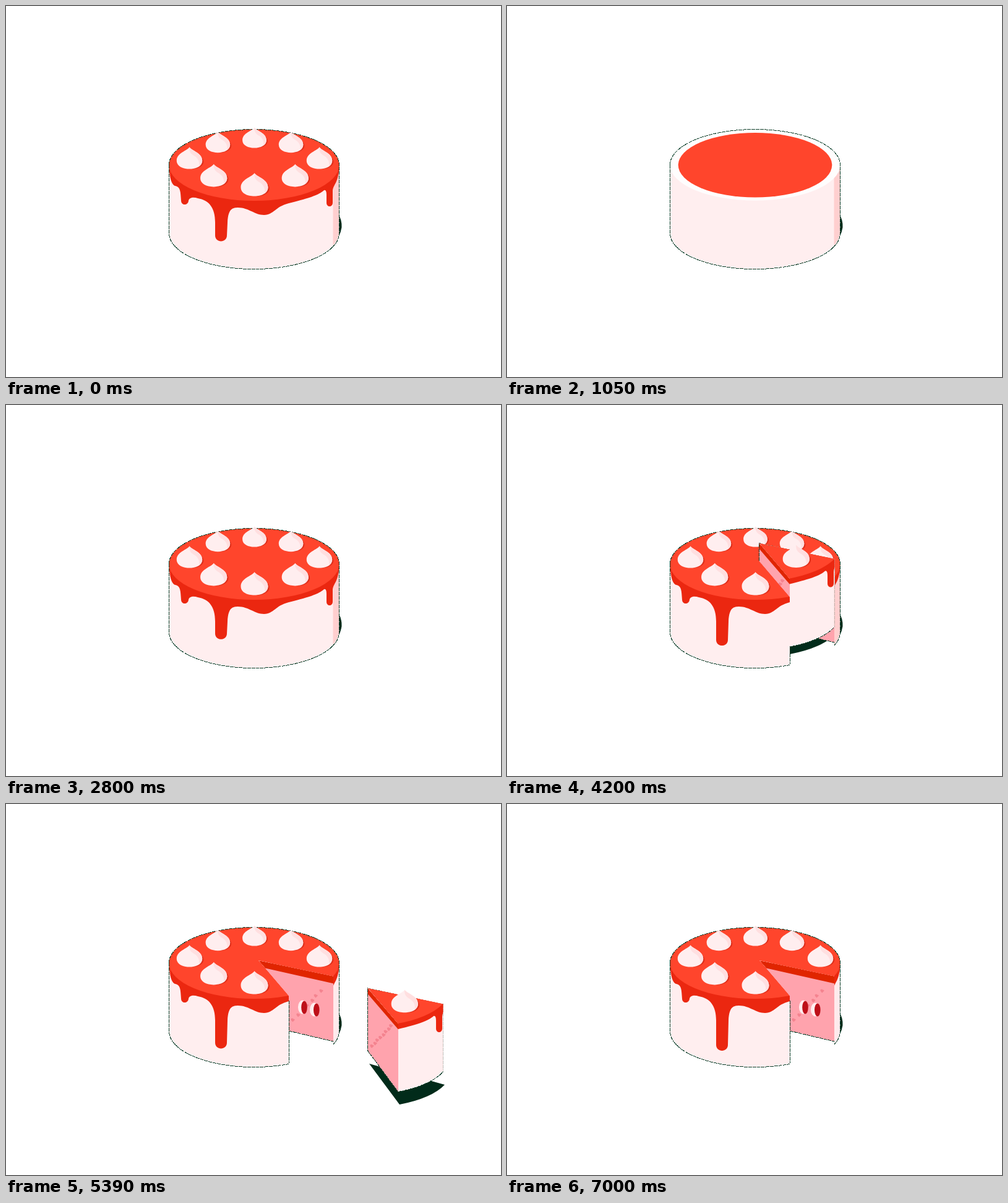
An HTML page that plays this animation: 800 px wide and 600 px high, repeating every 7420 ms.

```html
<!DOCTYPE html>
<html lang="en">
<head>
<meta charset="utf-8">
<title>Cake</title>
<style>
html, body { margin: 0; width: 100%; height: 100%; overflow: hidden; background: #fff; }
svg { display: block; width: 800px; height: 600px; }
.rim { fill: none; stroke: #0b3f2a; stroke-width: 1; stroke-dasharray: 6 1; shape-rendering: crispEdges; }
.dark { fill: #012b1a; }
.top { fill: #ff452c; }
.side { fill: #eb2710; }
.edge { fill: #e02500; }
.sponge { fill: #ffa3ad; }
.white { fill: #ffeeef; }
.pupil { fill: #bd1019; }
</style>
</head>
<body>
<svg viewBox="0 0 800 600">
  <defs>
    <clipPath id="wedge"><path d="M408 253L457 310.500V432H529.500V278.500Z"/></clipPath>
    <clipPath id="rest"><path clip-rule="evenodd" d="M0 0H800V600H0ZM408 253L457 310.500V432H529V278.500Z"/></clipPath>
    <clipPath id="behind"><path d="M400 0V243L408 253L457 310.500V600H800V0Z"/></clipPath>
    <g id="cream">
      <path fill="#df2f1a" d="M12 -7C17 -5 22 -1 22 5C22 11 14 16 4 16Z"/>
      <path class="white" d="M0 -18C4 -12 20 -9 20 3C20 12 10 16 0 16C-10 16 -20 12 -20 3C-20 -9 -4 -12 0 -18Z"/>
      <path fill="#ffdfe0" d="M0 -18C4 -12 20 -9 20 3Q20 8 15 12Q17 0 5 -6Q-1 -10 0 -18Z"/>
    </g>
    <path id="crumb" fill="#f4838f" d="M-3 -2Q0 -4 1 -2Q4 -2 3 0L0 3Q-3 1 -3 -2Z"/>
    <g id="whole">
      <path class="white" d="M263.500 257V367.500A137.500 58 0 0 0 538.500 367.500V257Z"/>
      <path id="strip" d="M528.500 257H538.500V367.500Q536 378 528.500 388Z"/>
      <ellipse cx="401" cy="257" rx="137.500" ry="57.500" fill="#fffdfd"/>
      <path id="icing" class="side"/>
      <ellipse id="pool" class="top" cx="401" cy="257.250"/>
      <path class="rim" d="M263.500 257V367.500A137.500 58 0 0 0 538.500 367.500V257A137.500 57.500 0 0 0 263.500 257Z"/>
    </g>
  </defs>

  <path id="sliceShadow" class="dark" d="M408 354L457 420A137.500 58 0 0 0 530 388Z"/>

  <g id="cake">
    <path class="dark" d="M537 337Q543 345 542.500 358Q540 374 528 386L536 360Z"/>
    <g id="inside">
      <path class="sponge" d="M408 253L529.500 279V384L457 367V311Z"/>
      <path class="edge" d="M408 253L530 278V290.500L419 265.500Z"/>
      <g id="wallCrumbs"></g>
      <ellipse class="white" cx="479" cy="328.500" rx="7" ry="11"/>
      <ellipse class="pupil" cx="482" cy="329" rx="4.800" ry="10.500"/>
      <ellipse class="white" cx="498.500" cy="332.500" rx="7.500" ry="11"/>
      <ellipse class="pupil" cx="501.800" cy="333" rx="4.800" ry="10.500"/>
      <path class="rim" d="M457.500 318V419M457 367L529 384"/>
    </g>
    <g id="main"><use href="#whole"/></g>
    <g id="creams"></g>
  </g>

  <g clip-path="url(#behind)">
    <g id="slice">
      <ellipse id="foot" cx="494" rx="5" ry="4" fill="#a8484a"/>
      <path class="sponge" d="M407.500 253L457 310V421L407.500 354Z"/>
      <g id="sliceCrumbs"></g>
      <path class="edge" d="M407.500 253L457 310.500V319.500L407.500 262Z"/>
      <path class="rim" d="M529.500 279L407.500 253V354L457 421M529.500 279V386"/>
      <g clip-path="url(#wedge)"><use href="#whole"/></g>
    </g>
  </g>
</svg>
<script>
const LOOP = 7420, STEP = 70, LAST = 7000, WHOLE_CAKE = 3010, CUT = 3990;
const $ = id => document.getElementById(id);
const progress = (t, from, to) => Math.min(1, Math.max(0, (t - from) / (to - from)));
const easeOut = p => 1 - (1 - p) ** 3;
const easeExpo = p => p <= 0 ? 0 : p >= 1 ? 1 : 1 - 2 ** (-10 * p);
const easeBack = p => p <= 0 ? 0 : 1 + 4.2 * (p - 1) ** 3 + 3.2 * (p - 1) ** 2;

const show = (el, on) => { el.style.display = on ? '' : 'none'; };
const place = (el, x, y, scale = 1) => el.setAttribute('transform', `translate(${x} ${y}) scale(${scale})`);

function addUse(href, parent) {
  const el = document.createElementNS('http://www.w3.org/2000/svg', 'use');
  el.setAttribute('href', href);
  return parent.appendChild(el);
}

// Spreads crumbs evenly over a slanted face.
function scatter(parent, count, left, top, width, height, slope) {
  for (let i = 1; i <= count; i++) {
    const dx = width * (i * 0.618 % 1);
    place(addUse('#crumb', parent), left + dx, top + slope * dx + height * (i * 0.377 % 1));
  }
}
scatter($('wallCrumbs'), 6, 458, 282, 60, 75, 0.21);
scatter($('sliceCrumbs'), 8, 411, 272, 36, 80, 1.2);

// Eight creams in a ring seen in perspective, clockwise from the back.
const creams = Array.from({ length: 8 }, (_, i) => {
  const angle = i * Math.PI / 4, side = Math.sin(angle), depth = -Math.cos(angle);
  return {
    delay: i * STEP,
    x: 401.5 + side * Math.sqrt(Math.abs(side)) * (105 + 8 * depth),
    y: 247 + 38 * depth + 5 * depth ** 4,
    size: 1.035 + 0.065 * depth
  };
});
const sliceCream = creams[3];
for (const cream of [...creams].sort((a, b) => a.y - b.y)) cream.el = addUse('#cream', $('creams'));
place(addUse('#cream', $('slice')), sliceCream.x, sliceCream.y, sliceCream.size);

const frontEdge = x => 257 + 58 * Math.sqrt(Math.max(0, 1 - ((x - 401) / 137.5) ** 2));

// Icing outline; flow 0 hugs the rim, 1 is fully run down.
function icingPath(tip, flow) {
  const outline = `M263.5 257C264 275 267 290 274 291C282 293 282 300 283 315
    C283.5 323 294 323 295 315C296 309 304 309 310 311C328 314 338 326 338 350
    L338 ${tip - 9.5}C338 ${tip + 3} 357 ${tip + 3} 357 ${tip - 9.5}L358 350
    C359 328 366 326 375 326C392 326 402 338 417 338C434 337 434 325 457 319
    C490 311 505 306 514 298C517 297 518 300 518 306L518 318C518 326 528 326 528 318
    L528 300C528 288 538 288 538.5 257Z`;
  return outline.replace(/([\d.]+) ([\d.]+)/g, (_, x, y) => {
    const edge = frontEdge(+x);
    return `${x} ${edge + (y - edge) * flow}`;
  });
}

function drawCake(t, cut) {
  const grow = easeOut(progress(t, 0, 840));
  place($('cake'), 401 * (1 - grow), 312 * (1 - grow), grow);

  const spread = easeExpo(progress(t, 800, 1540));
  $('pool').setAttribute('rx', 137.5 * spread);
  $('pool').setAttribute('ry', 57.75 * spread);

  const flow = easeOut(progress(t, 1470, 2310));
  const tip = 375 + 24 * Math.sin(progress(t, 2310, LAST) * Math.PI / 2);
  show($('icing'), flow > 0);
  $('icing').setAttribute('d', icingPath(tip, flow));

  for (const { el, x, y, size, delay } of creams) {
    place(el, x, y, size * easeBack(progress(t - delay, 1820, 2240)));
  }
  show(sliceCream.el, !cut);
  $('strip').setAttribute('fill', t < 4620 ? '#ffcfcf' : '#ffeaec');
  $('main').setAttribute('clip-path', cut ? 'url(#rest)' : 'none');
  show($('inside'), cut);
}

function drawSlice(t, cut) {
  show($('slice'), cut);
  show($('sliceShadow'), cut);
  const x = Math.max(0, 177 + (t - 5390) * 0.208);
  const ground = x * 0.254;
  const lift = 45 * Math.sin(Math.PI * progress(t, 4000, 4880));
  place($('slice'), x, ground - lift);
  place($('sliceShadow'), x + 2 * progress(t, 4200, 4760), ground - 17 + 38 * progress(t, 4200, 4760));
  show($('foot'), t > 4880);
  $('foot').setAttribute('cy', 403 + 7 * Math.cos((t - 5880) / 350 * 2 * Math.PI));
}

const start = performance.now();
function tick() {
  const elapsed = (performance.now() - start) % LOOP;
  const step = Math.min(LAST, Math.floor(elapsed / STEP) * STEP);
  const t = step || WHOLE_CAKE;
  drawCake(t, t >= CUT);
  drawSlice(t, t >= CUT);
  requestAnimationFrame(tick);
}
tick();
</script>
</body>
</html>
```
